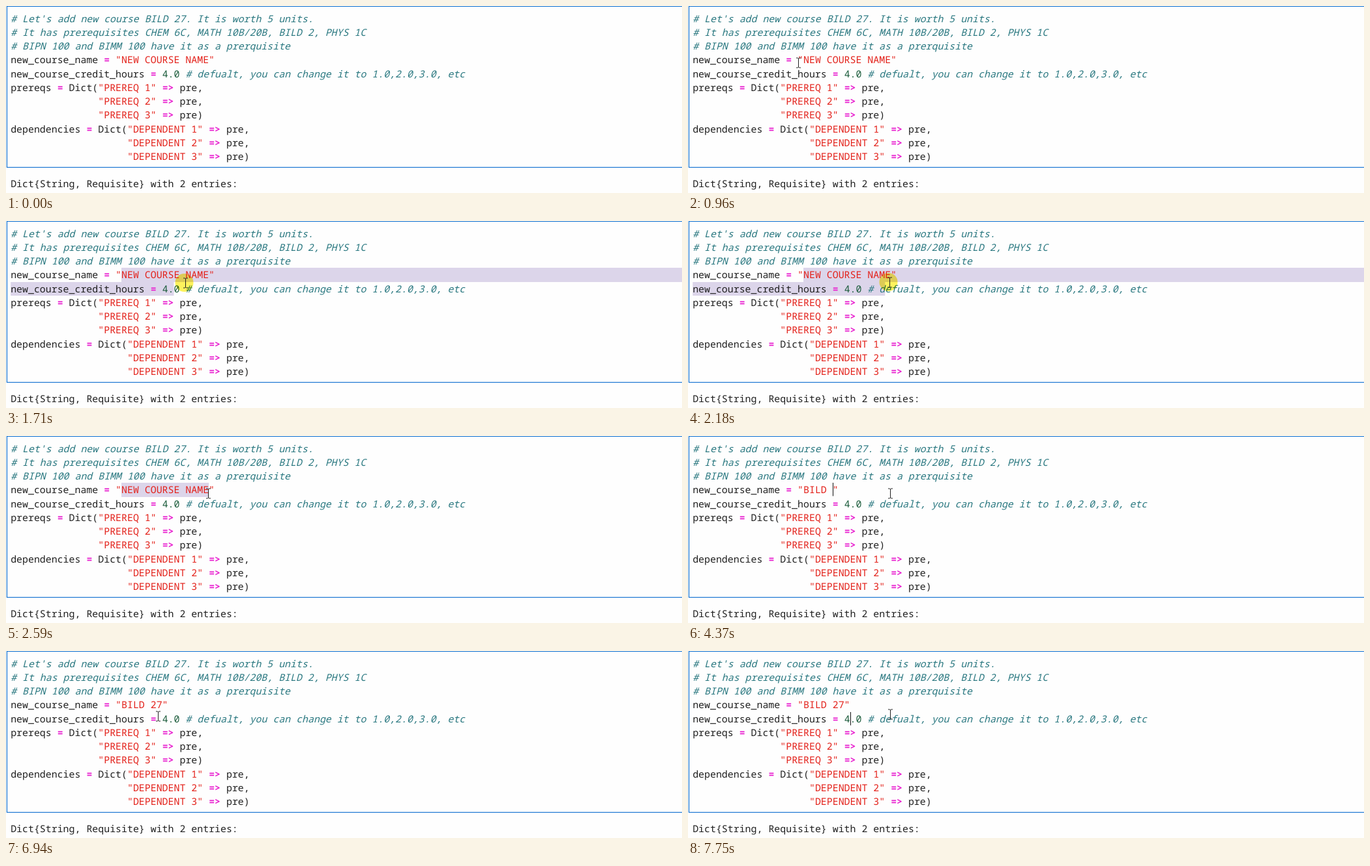
An HTML page for the animation above (8 s loop, 1037 by 288 pixels).

```html
<!DOCTYPE html>
<html lang="en">
<head>
<meta charset="utf-8">
<title>Adding a course</title>
<style>
  html, body { margin: 0; width: 100%; height: 100%; overflow: hidden; background: #fefefe; }
  svg { display: block; }
  text {
    font: 14.9px "Noto Sans Mono", "DejaVu Sans Mono", monospace;
    fill: #212121;
    white-space: pre;
    text-rendering: geometricPrecision;
  }
  .comment { fill: #2a7880; font-style: italic; }
  .string { fill: #e3211a; }
  .number { fill: #1c5c3c; }
  .operator { fill: #e81fcf; font-weight: bold; }
  .selection { fill: #dcd5ea; }
  #halo { fill: #fff034; opacity: .8; mix-blend-mode: multiply; }
  #pointer { fill: none; stroke: #222; }
</style>
</head>
<body>
<svg width="1037" height="288" viewBox="0 0 1037 288">
  <rect x="1.5" y="0.5" width="1050" height="248" fill="none" stroke="#1976d2" stroke-width="1.2"/>
  <rect class="selection" id="selTop"/>
  <rect class="selection" id="selNext"/>
  <g id="code"></g>
  <rect id="caret" width="1" height="20.5" fill="#111"/>
  <circle id="halo" r="14"/>
  <path id="pointer" d="M-3.5-7.5H-1L0-6.5 1-7.5H3.5M0-6.5V6.5M-3.5 7.5H-1L0 6.5 1 7.5H3.5"/>
</svg>
<script>
const LOOP = 8000, LEFT = 7.2, ADVANCE = 8.94, LINE = 21.25, TOP = 8.7, BASE = 24.5;
const NAME_ROW = 3, HOURS_ROW = 4, NAME_COL = 19;
const $ = id => document.getElementById(id);
const colX = col => LEFT + col * ADVANCE;
const rowY = row => TOP + row * LINE;

const lines = [
  "# Let's add new course BILD 27. It is worth 5 units.",
  "# It has prerequisites CHEM 6C, MATH 10B/20B, BILD 2, PHYS 1C",
  "# BIPN 100 and BIMM 100 have it as a prerquisite",
  'new_course_name = "NEW COURSE NAME"',
  "new_course_credit_hours = 4.0 # defualt, you can change it to 1.0,2.0,3.0, etc",
  'prereqs = Dict("PREREQ 1" => pre,',
  '               "PREREQ 2" => pre,',
  '               "PREREQ 3" => pre)',
  'dependencies = Dict("DEPENDENT 1" => pre,',
  '                    "DEPENDENT 2" => pre,',
  '                    "DEPENDENT 3" => pre)',
];

// Time of each keystroke and the name typed so far.
const typing = [
  [0, "NEW COURSE NAME"], [3510, "B"], [3580, "BI"], [3780, "BIL"],
  [4040, "BILD"], [4370, "BILD "], [4770, "BILD 2"], [4920, "BILD 27"],
];

const bursts = [
  [140, 900, 12], [960, 1170, 4], [1430, 2180, 12],
  [2250, 2320, 2], [6180, 6940, 12], [7010, 7220, 4], [7490, 7750, 4],
];

// Pointer path: time, x, y.
const path = [
  [140, 797, 281], [280, 640, 225], [420, 430, 150], [560, 280, 110],
  [700, 195, 92], [830, 154, 88], [900, 166, 87], [960, 169, 87],
  [1170, 178, 87], [1430, 178, 87], [1500, 190, 88], [1570, 215, 92],
  [1640, 265, 95], [1780, 288, 96], [2110, 303, 95], [2180, 309, 94],
  [2250, 310, 90], [2320, 310, 88], [6110, 310, 88], [6180, 314, 86],
  [6380, 354, 75], [6620, 290, 90], [6800, 221, 100], [6940, 233, 100],
  [7010, 237, 100], [7220, 248, 100], [7580, 248, 100], [7670, 272, 99],
  [7750, 310, 97],
];

const steps = bursts.flatMap(([start, end, n]) =>
  Array.from({ length: n }, (_, i) => Math.round(start + (end - start) * i / (n - 1))));

function pointerAt(t) {
  const i = path.findIndex(p => p[0] > t);
  if (i < 0) return path[path.length - 1].slice(1);
  if (i === 0) return path[0].slice(1);
  const [a, b] = [path[i - 1], path[i]];
  const k = (t - a[0]) / (b[0] - a[0]);
  return [a[1] + (b[1] - a[1]) * k, a[2] + (b[2] - a[2]) * k];
}

function tokens(line) {
  const rule = /(?<comment>#.*)|(?<string>"[^"]*")|(?<number>\b\d+\.\d+)|(?<operator>=>?)|[^\s#"=]+/g;
  return [...line.matchAll(rule)].map(m => {
    const kind = Object.keys(m.groups).find(k => m.groups[k]) || "";
    return `<tspan class="${kind}" x="${colX(m.index)}">${m[0].replace(">", "&gt;")}</tspan>`;
  }).join("");
}

function addLine(content, y) {
  const text = document.createElementNS("http://www.w3.org/2000/svg", "text");
  text.setAttribute("y", y);
  text.innerHTML = tokens(content);
  $("code").append(text);
  return text;
}

const rows = lines.map((line, i) => addLine(line, BASE + i * LINE));
addLine("Dict{String, Requisite} with 2 entries:", 279);

function place(el, attrs) {
  for (const key in attrs) el.setAttribute(key, attrs[key]);
}

function show(el, on) {
  el.style.display = on ? "" : "none";
}

function band(el, row, from, to) {
  const y = Math.round(rowY(row));
  place(el, { x: from, y, width: Math.max(0, to - from), height: Math.round(rowY(row + 1)) - y });
}

// The selection follows the pointer one step late.
function drawSelection(t, lastStep) {
  const start = colX(NAME_COL);
  const active = t >= 1430 && t < 3510;
  const [x, y] = pointerAt(t >= 2320 ? 2310 : lastStep);
  const col = Math.round((x - LEFT) / ADVANCE);
  const spill = y >= 93.5 && t < 2320;
  show($("selTop"), active);
  show($("selNext"), active && spill);
  band($("selTop"), NAME_ROW, start, spill ? 1037 : colX(col));
  band($("selNext"), HOURS_ROW, LEFT, colX(col));
}

function drawCaret(t, typed) {
  const clicked = t >= 7490;
  const row = clicked ? HOURS_ROW : NAME_ROW;
  const col = clicked ? 27 : NAME_COL + typed.length;
  const blinkOn = t < 4920 || clicked || Math.floor((t - 4920) / 530) % 2 === 0;
  show($("caret"), t >= 3510 && blinkOn);
  place($("caret"), { x: Math.round(colX(col)), y: Math.round(rowY(row)) });
}

let shownName = typing[0][1];

function draw(t) {
  const typed = typing.filter(k => k[0] <= t).pop()[1];
  if (typed !== shownName) {
    rows[NAME_ROW].innerHTML = tokens(`new_course_name = "${typed}"`);
    shownName = typed;
  }

  const past = steps.filter(s => s <= t);
  const now = past[past.length - 1] ?? 0;
  const [x, y] = pointerAt(now).map(Math.round);
  show($("pointer"), t >= 140);
  place($("pointer"), { transform: `translate(${x + .5} ${y + .5})` });
  show($("halo"), (t >= 1430 && t < 2590) || (t >= 7490 && t < 7660));
  place($("halo"), { cx: x - 1.5, cy: y });

  drawSelection(t, past[past.length - 2] ?? 0);
  drawCaret(t, typed);
}

const began = performance.now();
function tick() {
  draw((performance.now() - began) % LOOP);
  requestAnimationFrame(tick);
}
draw(0);
requestAnimationFrame(tick);
</script>
</body>
</html>
```
